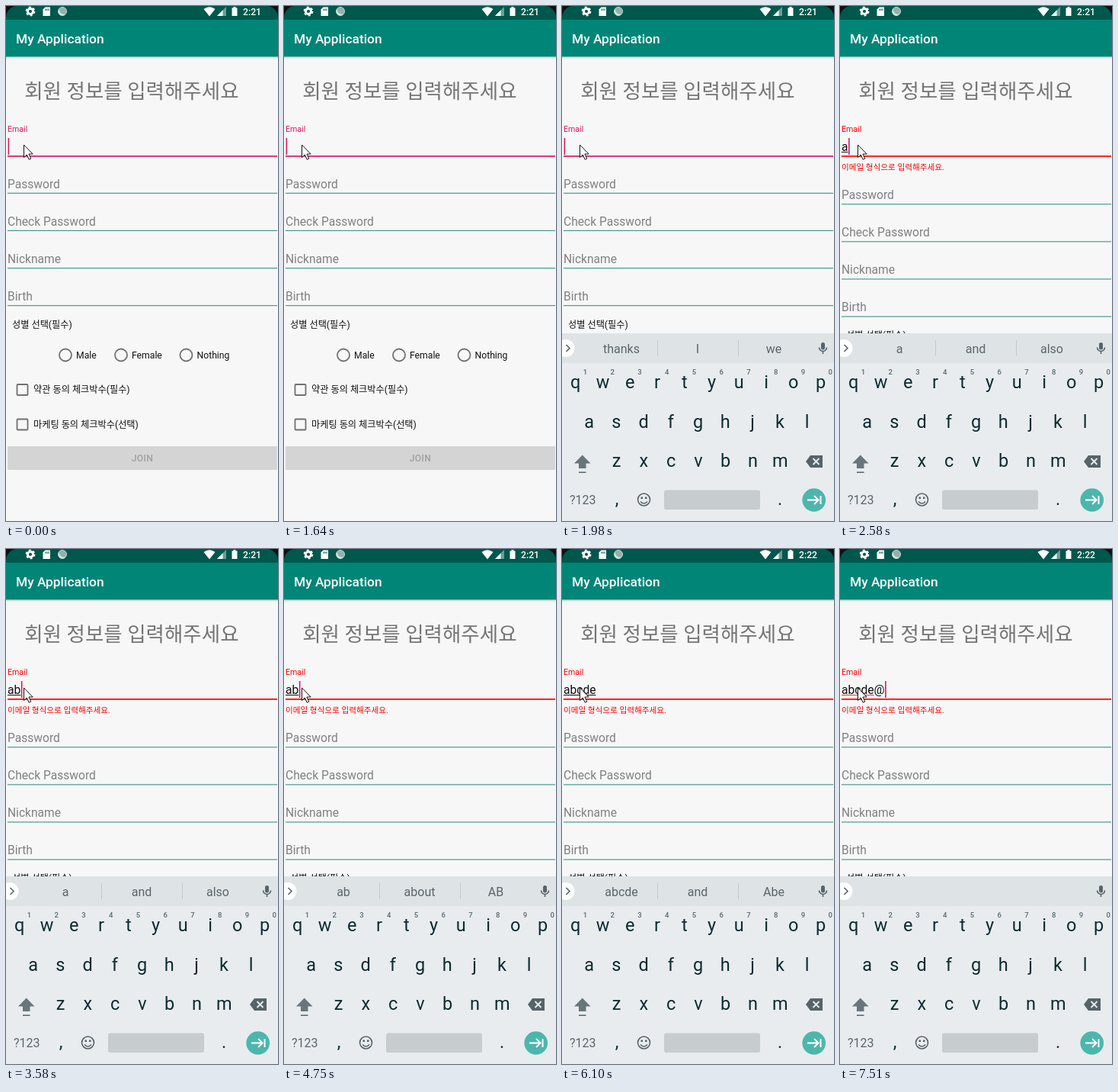
Animation of 357 by 675 pixels, one loop 7.99 s. Source, as an HTML page:

```html
<!DOCTYPE html>
<html lang="ko">
<head>
<meta charset="utf-8">
<title>Sign-up form</title>
<style>
  html, body { margin: 0; width: 100%; height: 100%; overflow: hidden; background: #f7f7f7; }
  svg { display: block; width: 357px; height: 675px; }
  text { font-family: Roboto, "Noto Sans CJK KR", "Noto Sans CJK", sans-serif; white-space: pre; }
  .bold { font-weight: 500; }
  .input { font-size: 15.6px; }
  .hint { fill: #808080; }
  .small { font-size: 10.6px; }
  .body { font-size: 12.2px; fill: #111; }
  .box { fill: none; stroke: #717171; stroke-width: 1.8; }
  .mid { text-anchor: middle; }
  .key { font-size: 23.5px; fill: #0c2b31; }
  .digit { font-size: 9.5px; fill: #5b676c; }
  .word { font-size: 16px; fill: #5b666a; }
  .icon { fill: #56646a; }
  .line { fill: none; stroke: #56646a; stroke-width: 1.6; }
</style>
</head>
<body>
<svg viewBox="0 0 357 675">
  <rect width="357" height="675" fill="#f7f7f7"/>
  <rect y="66.5" width="357" height="1.5" fill="#d2dcda"/>
  <rect y="68" width="357" height="2" fill="#eceeed"/>
  <rect width="357" height="66.5" fill="#008577"/>
  <rect width="357" height="18" fill="#00574b"/>
  <path d="M0 0H15A15 15 0 0 0 0 15ZM357 0H342A15 15 0 0 1 357 15Z" fill="#111"/>

  <!-- status bar -->
  <circle cx="32" cy="7" r="3.6" fill="none" stroke="#fff" stroke-width="3"/>
  <circle cx="32" cy="7" r="5.4" fill="none" stroke="#fff" stroke-width="2" stroke-dasharray="2.8 2.85"/>
  <path d="M51.5 1.5H58V13H48.5V4.5z" fill="#fff"/>
  <path d="M52 3.5v2.5M54 3.5v2.5M56 3.5v2.5" stroke="#00574b"/>
  <circle cx="74" cy="7" r="5.5" fill="#8fb3ac" stroke="#c4d7d3"/>
  <path d="M70 4a5 5 0 0 0 8 6.5a6 6 0 0 1-8-6.5z" fill="#d8e5e2"/>
  <path d="M259.5 4Q267 -1.5 274.5 4L267 13.5Z" fill="#fff"/>
  <path d="M289 1V13H277Z" fill="#6f9c95"/>
  <path d="M284.5 5.5V13H277Z" fill="#fff"/>
  <path d="M296.5 2.5h2v-1.5h3v1.5h2v10.5h-7z" fill="#fff"/>
  <text id="clock" class="bold" x="311" y="12" font-size="12.2" fill="#fff"></text>
  <text class="bold" x="13" y="49" font-size="17.33" fill="#fff">My Application</text>

  <!-- form -->
  <text x="24.2" y="121" font-size="26.5" fill="#757575">회원 정보를 입력해주세요</text>
  <text id="label" class="small" x="2" y="164.6">Email</text>
  <text id="email" class="input" x="2" y="190" fill="#111"></text>
  <rect id="underline" x="2" y="191" height="1"/>
  <rect id="emailLine" x="2" y="196" width="354" height="1.7"/>
  <rect id="cursor" y="173" width="1.6" height="22"/>
  <text id="error" class="small" x="2" y="215" fill="#f00">이메일 형식으로 입력해주세요.</text>
  <g id="form">
    <g id="fields"></g>
    <text class="body" x="8" y="422">성별 선택(필수)</text>
    <g id="radios"></g>
    <rect class="box" x="14.5" y="496" width="14" height="14" rx="1"/>
    <text class="body" x="36" y="507">약관 동의 체크박수(필수)</text>
    <rect class="box" x="14.5" y="541.5" width="14" height="14" rx="1"/>
    <text class="body" x="36" y="553">마케팅 동의 체크박수(선택)</text>
    <rect x="2" y="577" width="354" height="31" rx="1" fill="#d4d4d4"/>
    <text class="mid bold" x="179" y="597" font-size="12.2" letter-spacing=".3" fill="#a0a0a0">JOIN</text>
  </g>

  <!-- keyboard -->
  <g id="keyboard">
    <rect y="429" width="357" height="246" fill="#e8ecef"/>
    <rect y="429" width="357" height="39" fill="#dee3e6"/>
    <circle cx="5" cy="448.5" r="11.5" fill="#fff"/>
    <path class="line" d="M5.5 444l4.5 4.5l-4.5 4.5"/>
    <path id="dividers" d="M125.5 438v21M231.5 438v21" stroke="#c3c9cc"/>
    <g id="words"></g>
    <rect class="icon" x="340" y="441" width="5" height="9.5" rx="2.5"/>
    <path class="line" d="M337.5 447.5a5 5 0 0 0 10 0M342.5 452.5v3.5"/>
    <g id="keys"></g>
    <path id="shift" d="M26.7 588.5L37.5 599.5H31.5V606H22V599.5H16Z"/>
    <rect class="icon" x="22" y="610.5" width="9.5" height="1.5"/>
    <path class="icon" d="M326 589h16v16h-16l-6-8z"/>
    <path d="M329.5 593l8 8m0-8l-8 8" stroke="#e8ecef" stroke-width="1.8"/>
    <text class="word" x="10" y="653">?123</text>
    <text class="key mid" x="72" y="654">,</text>
    <circle class="line" cx="107.5" cy="647" r="8"/>
    <path class="line" d="M103 649.5q4.5 5 9 0"/>
    <path class="icon" d="M103.5 643.5h2.5v2.5h-2.5zM109 643.5h2.5v2.5h-2.5z"/>
    <rect x="134" y="634.5" width="126" height="25.5" rx="2.5" fill="#c7ccce"/>
    <text class="key mid" x="286" y="654">.</text>
    <circle cx="330.7" cy="647.5" r="15.3" fill="#4db6ac"/>
    <path d="M322 647.5h14M331 642l5.5 5.5l-5.5 5.5M339.5 642v11" fill="none" stroke="#fff" stroke-width="2"/>
  </g>

  <path d="M23.5 182v16.5l3.8-3.5l2.9 6.2l2.6-1.2l-2.9-6h5.3z" fill="#fff" stroke="#111"/>
</svg>
<script>
const LOOP = 7990;
const $ = id => document.getElementById(id);
const show = (id, on) => $(id).style.display = on ? "" : "none";

function add(parent, tag, attrs, text = "") {
  const el = document.createElementNS("http://www.w3.org/2000/svg", tag);
  for (const name in attrs) el.setAttribute(name, attrs[name]);
  el.textContent = text;
  return $(parent).appendChild(el);
}

["Password", "Check Password", "Nickname", "Birth"].forEach((name, i) => {
  const y = 238.5 + i * 49.1;
  add("fields", "text", { class: "input hint", x: 2, y }, name);
  add("fields", "rect", { x: 2, y: y + 6.3, width: 354, height: 1.1, fill: "#3c9388" });
});

[["Male", 78], ["Female", 151], ["Nothing", 236.5]].forEach(([name, x]) => {
  add("radios", "circle", { class: "box", cx: x, cy: 457.5, r: 8 });
  add("radios", "text", { class: "body", x: x + 14, y: 462 }, name);
});

const letters = [];
[["qwertyuiop", 17.8, 501], ["asdfghjkl", 35.6, 552.5], ["zxcvbnm", 71.7, 604]].forEach(([row, x0, y], r) =>
  [...row].forEach((ch, i) => {
    const x = x0 + i * 35.75;
    letters.push([add("keys", "text", { class: "key mid", x, y }), ch]);
    if (r === 0) add("keys", "text", { class: "digit mid bold", x: x + 12.7, y: 483 }, (i + 1) % 10);
  }));

const words = [78, 178, 278].map(x => add("words", "text", { class: "word mid", x, y: 454.5 }));

// Each track lists [start time, value].
const typed = [[0, ""], [2580, "a"], [3580, "ab"], [4840, "abc"], [4990, "abcd"], [5390, "abcde"],
  [6190, "abcde#"], [6490, "abcde#2"], [6890, "abcde#"], [7130, "abcde"], [7510, "abcde@"]];
const suggestions = [[0, "thanks I we"], [2430, "a and also"], [3670, "ab about AB"],
  [4990, "abcd and Abc"], [5480, "abcde and Abe"], [6190, ""]];
const blinks = [200, 1130, 1210, 1640, 1810, 1980, 2970, 3580, 4130, 4750, 5860, 6190];
const valueAt = (track, t) => track.filter(([start]) => start <= t).pop()[1];

function render(t) {
  const invalid = t >= 2580;
  const tint = invalid ? "#f00" : "#d81b60";
  $("clock").textContent = t < 4840 ? "2:21" : "2:22";
  $("label").setAttribute("fill", tint);
  $("emailLine").setAttribute("fill", tint);
  show("error", invalid);
  $("form").setAttribute("transform", `translate(0 ${invalid ? 14.4 : 0})`);

  const text = valueAt(typed, t);
  $("email").textContent = text;
  const width = text ? $("email").getComputedTextLength() : 0;
  $("underline").setAttribute("width", Math.min(width, 42.5));
  $("underline").setAttribute("fill", t < 6190 ? "#111" : "#e03a3a");
  $("cursor").setAttribute("x", 2.6 + width);
  $("cursor").setAttribute("fill", "#d81b60");
  show("cursor", blinks.filter(b => b <= t).length % 2 === 0);

  const sliding = t < 1980;
  show("keyboard", t >= 1810);
  $("keyboard").setAttribute("opacity", sliding ? 0.76 : 1);
  $("keyboard").setAttribute("transform", `translate(0 ${sliding ? 20 : 0})`);
  const list = valueAt(suggestions, t).split(" ");
  words.forEach((el, i) => el.textContent = list[i] || "");
  show("dividers", list.length > 1);

  const upper = t >= 6040 && t < 6100;
  letters.forEach(([el, ch]) => el.textContent = upper ? ch.toUpperCase() : ch);
  $("shift").setAttribute("fill", upper ? "#4db6ac" : "#68767c");
}

const begin = performance.now();
function tick() {
  render((performance.now() - begin) % LOOP);
  requestAnimationFrame(tick);
}
tick();
</script>
</body>
</html>
```
